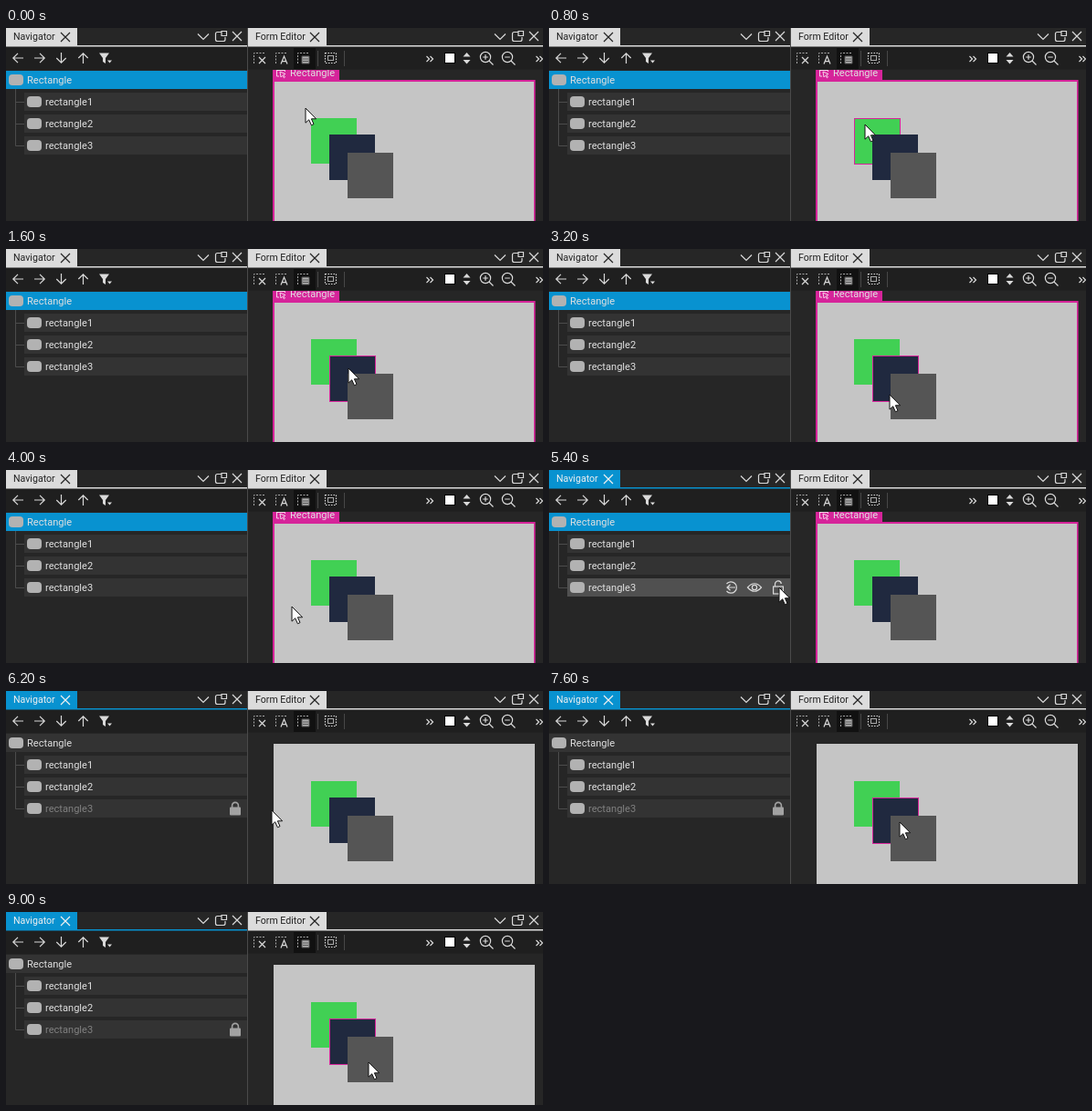
An HTML page that plays this animation: 588 px wide and 212 px high, repeating every 9.2 s.

```html
<!DOCTYPE html>
<html lang="en">
<head>
<meta charset="utf-8">
<title>Locking an item</title>
<style>
  html, body { margin: 0; width: 100%; height: 100%; overflow: hidden; background: #262626; }
  svg { display: block; width: 588px; height: 212px; }
  text { font: 11.1px Roboto, "Open Sans", sans-serif; fill: #e0e0e0; }
  .tab { font-size: 10.6px; fill: #222; }
  .line { fill: none; stroke: #dadada; stroke-width: 1.2; }
  .dim { fill: none; stroke: #a8a8a8; stroke-width: 1; }
  .pink { fill: none; stroke: #d6249a; }
</style>
</head>
<body>
<svg viewBox="0 0 588 212">
  <defs>
    <path id="cross" d="M0 0L10 10M10 0L0 10"/>
    <g id="paneButtons" class="line">
      <path d="M0 6.5L6 12.5L12 6.5"/>
      <path d="M26 4.5H21.5Q19.5 4.5 19.5 6.5V12.5Q19.5 14.5 21.5 14.5H28Q30 14.5 30 12.5V10M26 3.5H31.5V8.5H26Z"/>
      <use href="#cross" x="38" y="4"/>
    </g>
    <rect id="chip" width="16" height="12" rx="4" fill="#b2b2b2"/>
    <path id="arrow" class="line" d="M12 5.5H.8M6 .3L.8 5.5L6 10.7"/>
    <path id="more" class="line" d="M0 0L3 3L0 6M4 0L7 3L4 6"/>
    <path id="frame" class="dim" d="M.5 12V.5H13" stroke-dasharray="2 1.5"/>
    <g id="lens" class="line">
      <circle cx="6.5" cy="6.5" r="5.6"/>
      <path d="M10.5 10.5L15 15M3.7 6.5H9.3"/>
    </g>
    <clipPath id="view"><rect x="265" y="46" width="314.6" height="166"/></clipPath>
  </defs>

  <rect width="588" height="212" fill="#262626"/>

  <!-- navigator -->
  <rect y="20" width="264" height="26" fill="#1f1f1f"/>
  <g id="navTab"><rect width="78" height="19"/><rect y="19" width="264" height="1.5"/></g>
  <text id="navTitle" class="tab" x="8" y="13">Navigator</text>
  <use id="navClose" href="#cross" x="60" y="5" stroke-width="1.2"/>
  <use href="#paneButtons" x="210"/>
  <use href="#arrow" x="7" y="27.5"/>
  <use href="#arrow" transform="translate(43 38.5) rotate(180)"/>
  <use href="#arrow" transform="translate(55 39) rotate(-90)"/>
  <use href="#arrow" transform="translate(90 27) rotate(90)"/>
  <path d="M102 27.5H113L109 33V39L106 37V33Z M111 35.5H116L113.5 38.5Z" fill="#dadada"/>

  <path d="M10.5 67V129.5H20M10.5 81.5H20M10.5 105.5H20" fill="none" stroke="#4c4c4c"/>
  <rect id="rootRow" y="47" width="264" height="20"/>
  <use href="#chip" x="3" y="51"/>
  <text x="23" y="61">Rectangle</text>
  <g id="rows"></g>
  <g id="rowTools" class="line">
    <path d="M194.5 125A6.2 6.2 0 1 1 194.5 133M204 129H195M198.5 125.7L195 129L198.5 132.3"/>
    <path d="M217.5 129Q225 120.5 232.5 129Q225 137.5 217.5 129Z"/>
    <circle cx="225" cy="129" r="2.6"/>
  </g>
  <g id="openLock" class="line">
    <rect x="245.6" y="128" width="10.8" height="8"/>
    <path d="M247.5 128V125.5A3.4 3.4 0 0 1 254.3 125"/>
  </g>
  <g id="shutLock">
    <rect x="245" y="127.5" width="12" height="9" rx="1" fill="#a2a2a2"/>
    <path d="M247.6 128V125.8A3.4 3.4 0 0 1 254.4 125.8V128" fill="none" stroke="#a2a2a2" stroke-width="1.6"/>
  </g>
  <path d="M264.5 0V212" stroke="#4a4a4a"/>

  <!-- form editor -->
  <g clip-path="url(#view)">
    <rect x="293" y="58" width="286" height="154" fill="#c5c5c5"/>
    <g id="rects"></g>
    <g id="selection">
      <rect x="292" y="40" width="73" height="18" fill="#d6249a"/>
      <path class="pink" stroke-width="2" d="M293 212V58H579V212"/>
      <path d="M296.5 46V53H299M296.5 46.5H305.5V48M300 48L306 50.5L303.5 51.5L305.5 54L304.5 54.8L302.6 52.4L301 54Z" fill="none" stroke="#f4d4e8"/>
      <text x="311" y="53" fill="#f4d4e8">Rectangle</text>
    </g>
  </g>
  <rect x="265" y="20" width="323" height="25.5" fill="#1f1f1f"/>
  <path d="M265 0H351V19H588V20.5H265Z" fill="#dcdcdc"/>
  <text class="tab" x="273" y="13">Form Editor</text>
  <use href="#cross" x="333" y="5" stroke="#222" stroke-width="1.2"/>
  <use href="#paneButtons" x="535"/>
  <rect x="315" y="22" width="24" height="23" fill="#111"/>
  <use href="#frame" x="271" y="27"/>
  <path class="line" d="M277 32L284 39M284 32L277 39"/>
  <use href="#frame" x="295" y="27"/>
  <path class="line" d="M301 39.5L304.5 31L308 39.5M302.3 36.7H306.7"/>
  <use href="#frame" x="319" y="27"/>
  <path d="M324 31H332V39H324ZM325 34H331M325 36.5H331" fill="#b0b0b0" stroke="#555"/>
  <path d="M341.5 25V42M370.5 25V42" stroke="#484848"/>
  <rect class="line" x="349.5" y="27.5" width="12" height="11" stroke-dasharray="1.5 1.5"/>
  <rect class="dim" x="352.5" y="30.5" width="6" height="5"/>
  <use href="#more" x="460.5" y="31"/>
  <rect x="480.5" y="27.5" width="11" height="11" fill="#fff" stroke="#000"/>
  <path d="M500.5 31.5L504.5 27L508.5 31.5ZM500.5 35L504.5 39.5L508.5 35Z" fill="#dadada"/>
  <use href="#lens" x="518.5" y="25.5"/>
  <path class="line" d="M525 29.2V34.8"/>
  <use href="#lens" x="542.5" y="25.5"/>
  <use href="#more" x="580.5" y="31"/>

  <path id="cursor" d="M0 0V16.2L3.7 12.8L6.4 18.8L9 17.6L6.4 11.8H11.6Z" fill="#fff" stroke="#111" stroke-width="1" stroke-linejoin="round"/>
</svg>
<script>
const LOOP = 9200, STEP = 200;
const FOCUS_AT = 5400, LOCK_AT = 5600;
const NS = 'http://www.w3.org/2000/svg';
const $ = id => document.getElementById(id);

function add(parent, tag, attrs, text) {
  const el = document.createElementNS(NS, tag);
  for (const k in attrs) el.setAttribute(k, attrs[k]);
  if (text) el.textContent = text;
  return parent.appendChild(el);
}

const items = [
  { x: 334, y: 99, fill: '#41d054' },
  { x: 354, y: 117, fill: '#20293f' },
  { x: 374, y: 137, fill: '#555555' }
];
items.forEach((it, i) => {
  const { x, y, fill } = it;
  add($('rects'), 'rect', { x, y, width: 50, height: 50, fill });
  it.outline = add($('rects'), 'rect', { class: 'pink', x: x + .5, y: y + .5, width: 50, height: 50 });
  it.top = 71 + 24 * i;
  it.row = add($('rows'), 'rect', { x: 20, y: it.top, width: 244, height: 20 });
  add($('rows'), 'use', { href: '#chip', x: 23, y: it.top + 4 });
  it.label = add($('rows'), 'text', { x: 43, y: it.top + 14 }, 'rectangle' + (i + 1));
});

// pointer path: time, x, y
const path = [
  [0, 328, 88], [800, 346, 106], [1200, 352, 112], [1400, 352, 112],
  [1600, 375, 131], [2200, 398, 152], [3000, 398, 152],
  [3200, 373, 160], [4200, 298, 148], [4400, 272, 110], [4600, 252, 129], [6000, 252, 129],
  [6200, 291, 131], [6400, 306, 112], [6600, 325, 98], [6800, 347, 104], [7000, 364, 120],
  [7200, 374, 133], [7600, 384, 144], [7800, 408, 148], [8000, 430, 155],
  [8200, 412, 164], [8400, 391, 168], [8600, 397, 165], [LOOP, 397, 165]
];

function pointer(t) {
  const i = path.findIndex(p => p[0] > t);
  const [t0, x0, y0] = path[i - 1], [t1, x1, y1] = path[i];
  const k = (t - t0) / (t1 - t0);
  return [x0 + (x1 - x0) * k, y0 + (y1 - y0) * k];
}

const inside = (x, y, left, top, w, h) => x >= left && x < left + w && y >= top && y < top + h;
const show = (el, on) => el.setAttribute('visibility', on ? 'visible' : 'hidden');

function draw(time) {
  const t = Math.floor(time % LOOP / STEP) * STEP;
  const [x, y] = pointer(t).map(Math.round);
  const focus = t >= FOCUS_AT, locked = t >= LOCK_AT;
  $('cursor').setAttribute('transform', `translate(${x} ${y})`);

  const open = locked ? items.slice(0, 2) : items;
  const hit = [...open].reverse().find(it => inside(x, y, it.x, it.y, 50, 50));
  const last = items[2];
  const overRow = inside(x, y, 20, last.top, 244, 20);
  for (const it of items) {
    show(it.outline, it === hit);
    it.row.style.fill = it === last && overRow && !locked ? '#505050' : '#333';
  }
  last.label.style.fill = locked ? '#808080' : '#e0e0e0';
  show($('rowTools'), overRow);
  show($('openLock'), overRow && !locked);
  show($('shutLock'), locked);
  show($('selection'), !locked);
  $('rootRow').style.fill = locked ? '#333' : '#0892d0';
  $('navTab').style.fill = focus ? '#0892d0' : '#dcdcdc';
  $('navTitle').style.fill = $('navClose').style.stroke = focus ? '#f0f0f0' : '#222';
}

const start = performance.now();
function tick() {
  draw(performance.now() - start);
  requestAnimationFrame(tick);
}
tick();
</script>
</body>
</html>
```
